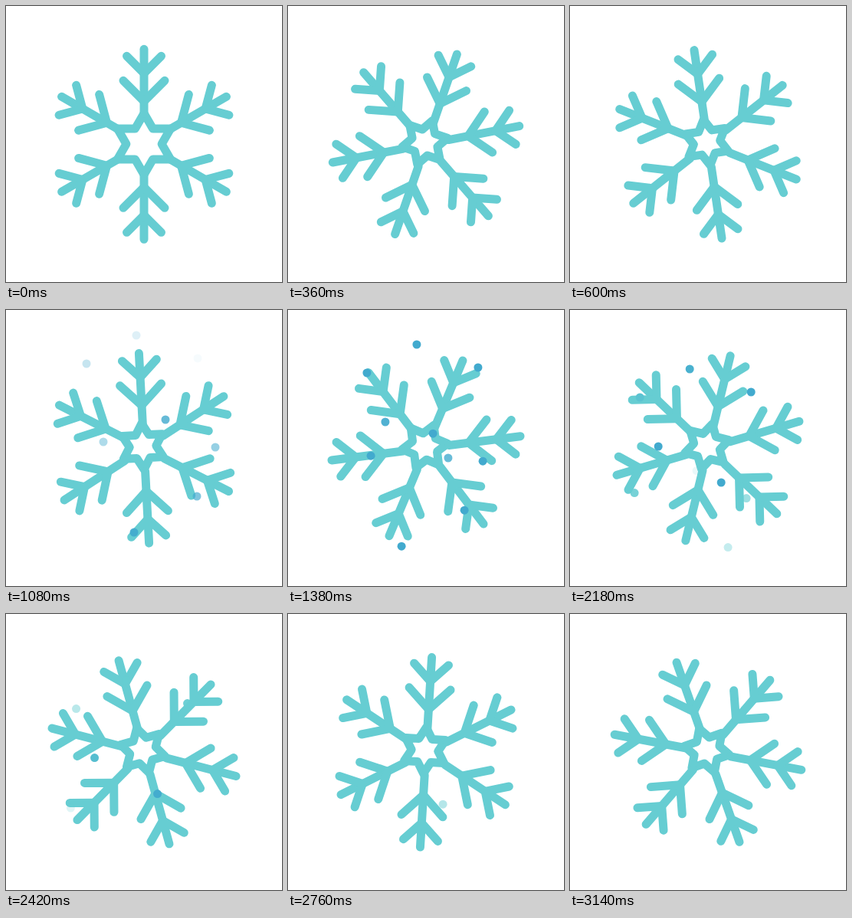
These frames come from a looping animation (360x360 px, 3.16 s). An HTML page with a canvas:

```html
<!DOCTYPE html>
<html lang="en">
<head>
<meta charset="utf-8">
<title>Snowflake</title>
<style>
html, body { margin: 0; width: 100%; height: 100%; overflow: hidden; background: #fff; }
canvas { display: block; width: 360px; height: 360px; }
</style>
</head>
<body>
<canvas id="stage"></canvas>
<script>
const SIZE = 360, LOOP = 3160, HOLD = 180, STEP = 20;
const ICE = [102, 205, 210], BLUE = [66, 170, 206];
const canvas = document.getElementById('stage');
const ratio = window.devicePixelRatio || 1;
canvas.width = canvas.height = SIZE * ratio;
const ctx = canvas.getContext('2d');

const clamp = v => Math.max(0, Math.min(1, v));
const rgb = c => `rgb(${c.map(Math.round).join(',')})`;

// Time and degrees: a steady turn that slows twice
const spin = [[180, -20.5], [1700, -193.7], [2180, -226.4], [2760, -296.5], [3140, -319.3]];

function turn(t) {
  const i = Math.max(1, spin.findIndex(k => k[0] >= t));
  const [t0, a0] = spin[i - 1], [t1, a1] = spin[i];
  return a0 + (a1 - a0) * (t - t0) / (t1 - t0);
}

function line(...points) {
  ctx.beginPath();
  points.forEach(([x, y]) => ctx.lineTo(x, y));
  ctx.stroke();
}

function star(radius) {
  ctx.beginPath();
  for (let i = 0; i < 12; i++) {
    const r = i % 2 ? radius / Math.sqrt(3) : radius, a = i * Math.PI / 6;
    ctx.lineTo(r * Math.sin(a), -r * Math.cos(a));
  }
  ctx.closePath();
  ctx.stroke();
}

function flake(degrees, radius, dx, dy) {
  const angle = degrees * Math.PI / 180;
  ctx.strokeStyle = rgb(ICE);
  ctx.lineWidth = 11;
  ctx.lineCap = ctx.lineJoin = 'round';

  ctx.save();
  ctx.translate(180 + dx, 180 + dy);
  ctx.rotate(angle);
  star(radius);
  ctx.restore();

  ctx.save();
  ctx.translate(180, 180.3);
  ctx.rotate(angle);
  for (let i = 0; i < 6; i++) {
    line([0, -radius], [0, -124]);
    line([-22.5, -115], [0, -92.5], [22.5, -115]);
    line([-27, -83], [0, -56], [27, -83]);
    ctx.rotate(Math.PI / 3);
  }
  ctx.restore();
}

// Two layers of falling snow; places are those at SNOW ms
const SNOW = 1080;
const layers = [
  { places: [[167, 290], [208, 143], [249, 243], [273, 179], [127, 172]],
    x: s => -72 * s + 30 * s * s, y: s => 60.5 * s },
  { places: [[105, 70], [170, 33], [250, 63], [129, 134], [211, 181]],
    x: s => -14 * Math.sin(1.32 * s) ** 2, y: s => 40 * s }
];

// Each dot comes and goes a little after the one before
function dot(x, y, order, t) {
  const age = t - (800 + 38 * order), left = 2140 + 88 * order - t;
  const alpha = Math.min(clamp(age / 300), clamp(left / 350));
  const mix = clamp((520 - left) / 170);
  ctx.globalAlpha = alpha;
  ctx.fillStyle = rgb(BLUE.map((c, i) => c + (ICE[i] - c) * mix));
  ctx.beginPath();
  ctx.arc(x, y, 5.5, 0, 2 * Math.PI);
  ctx.fill();
  ctx.globalAlpha = 1;
}

function snow(t) {
  const s = (t - SNOW) / 1000;
  layers.forEach((layer, n) => layer.places.forEach(([x, y], i) =>
    dot(x + layer.x(s), y + layer.y(s), n * 5 + i, t)));
}

function draw(now) {
  const t = Math.floor((now % LOOP) / STEP) * STEP;
  ctx.setTransform(ratio, 0, 0, ratio, 0, 0);
  ctx.fillStyle = '#fff';
  ctx.fillRect(0, 0, SIZE, SIZE);
  if (t < HOLD) flake(0, 40, 0, 0);
  else flake(turn(t), 30, -1.5, -2);
  snow(t);
}

let begin;
function tick(now) {
  if (begin === undefined) begin = now;
  draw(Math.max(0, now - begin));
  requestAnimationFrame(tick);
}
draw(0);
requestAnimationFrame(tick);
</script>
</body>
</html>
```
